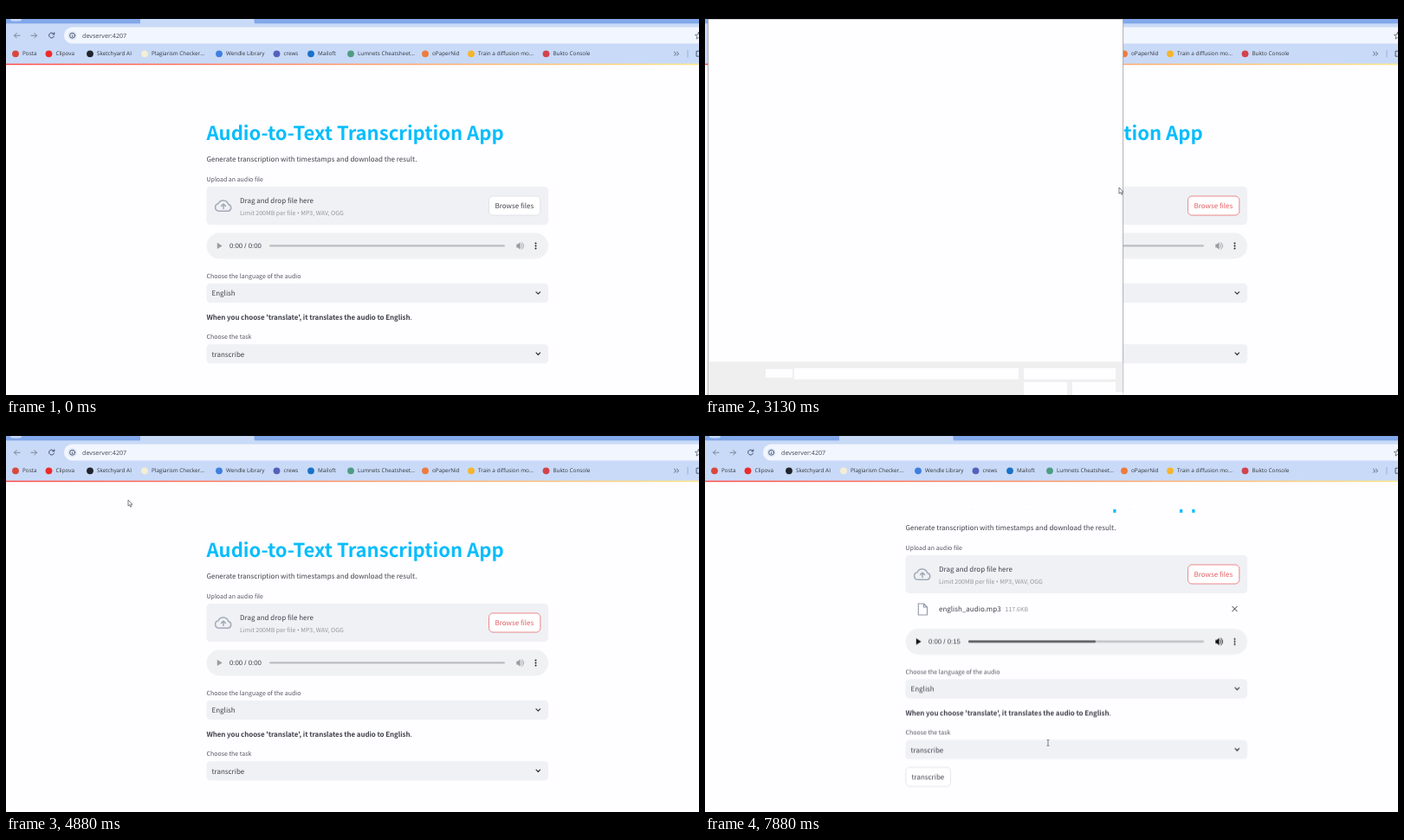
Animation of 800 by 450 pixels, one loop 8000 ms. Source, as an HTML page:

```html
<!DOCTYPE html>
<html lang="en">
<head>
<meta charset="utf-8">
<title>Transcription app</title>
<style>
html, body { margin: 0; width: 100%; height: 100%; overflow: hidden; background: #fefdff; }
svg { display: block; width: 800px; height: 450px; }
text { white-space: pre; text-rendering: geometricPrecision; }

.page text { font: 8px "Noto Sans CJK SC", "Noto Sans CJK JP", "Noto Sans CJK", sans-serif; fill: #40424c; }
.page .title { font-size: 22.1px; font-weight: 700; letter-spacing: -.02px; fill: #08bdfc; }
.page .label { font-size: 7px; fill: #555761; }
.page .faint { font-size: 7px; fill: #96989f; }
.page .strong { font-weight: 700; letter-spacing: -.095px; }
.page .bullet { font-family: "Noto Sans", sans-serif; }
.page .time { font: 7.8px "Liberation Sans", sans-serif; }
.page .warm { fill: #e25b5f; }
.field { fill: #eff1f5; }
.ui text { font: 6.35px "Open Sans", "Noto Sans", sans-serif; fill: #33353b; }
.ui .url { font-size: 7.2px; fill: #44474e; }
.ui .head { fill: #56637a; }
.line { fill: none; stroke: currentColor; stroke-linecap: round; stroke-linejoin: round; }

/* 64 ticks of 125 ms; state changes hold, the pointer steps once per tick */
.hover, .empty, .loaded, .below, .scroll, .dialog, .content, .ripple, .arrow, .hand, .beam
  { animation: 8s step-end infinite; }
.hover { animation-name: hover; }
.empty { animation-name: empty; }
.loaded { animation-name: loaded; }
.below { animation-name: below; }
.scroll { animation-name: scroll; }
.dialog { animation-name: dialog; }
.content { animation-name: content; }
.ripple { animation-name: ripple; }
.arrow { animation-name: arrow; }
.hand { animation-name: hand; }
.beam { animation-name: beam; }
.pointer { animation: travel 8s linear infinite; }

@keyframes hover { 0% { opacity: 0 } 21.875%, 100% { opacity: 1 } }
@keyframes empty { 0% { opacity: 1 } 67.1875%, 100% { opacity: 0 } }
@keyframes loaded { 0% { opacity: 0 } 67.1875%, 100% { opacity: 1 } }
@keyframes below { 0% { transform: none } 67.1875%, 100% { transform: translateY(31.4px) } }
@keyframes scroll {
  0% { transform: none }
  95.3125% { transform: translateY(-14px) }
  96.875% { transform: translateY(-46px) }
  98.4375%, 100% { transform: translateY(-56px) }
}
@keyframes dialog { 0%, 57.8125%, 100% { opacity: 0 } 35.9375% { opacity: 1 } }
@keyframes content { 0% { opacity: 0 } 42.1875%, 100% { opacity: 1 } }
@keyframes ripple { 0%, 79.6875%, 100% { opacity: 0 } 75% { opacity: 1 } }
@keyframes arrow {
  0%, 21.875%, 75%, 82.8125%, 100% { opacity: 0 }
  9.375%, 34.375%, 79.6875% { opacity: 1 }
}
@keyframes hand { 0%, 34.375%, 79.6875%, 100% { opacity: 0 } 21.875%, 75% { opacity: 1 } }
@keyframes beam { 0% { opacity: 0 } 82.8125%, 100% { opacity: 1 } }
@keyframes travel {
  0% { transform: translate(724px, 318px); animation-timing-function: step-end }
  9.375% { transform: translate(724px, 318px); animation-timing-function: steps(6) }
  18.75% { transform: translate(640px, 262px); animation-timing-function: steps(2) }
  21.875% { transform: translate(600px, 236px); animation-timing-function: steps(3) }
  26.5625% { transform: translate(574px, 229px); animation-timing-function: steps(5) }
  34.375% { transform: translate(570px, 229px); animation-timing-function: steps(3) }
  39.0625% { transform: translate(478px, 210px); animation-timing-function: steps(9) }
  53.125% { transform: translate(138px, 92px); animation-timing-function: steps(5) }
  60.9375% { transform: translate(141px, 89px); animation-timing-function: steps(2) }
  64.0625% { transform: translate(165px, 118px); animation-timing-function: steps(8) }
  76.5625% { transform: translate(247.5px, 306.5px); animation-timing-function: steps(2) }
  79.6875% { transform: translate(275px, 335px); animation-timing-function: steps(2) }
  82.8125% { transform: translate(380px, 366px); animation-timing-function: steps(3) }
  87.5% { transform: translate(452px, 368px); animation-timing-function: steps(3) }
  92.1875%, 100% { transform: translate(396px, 370px) }
}
</style>
</head>
<body>
<svg viewBox="0 0 800 450">
  <defs>
    <linearGradient id="stripe" gradientUnits="userSpaceOnUse" x1="0" x2="850" y1="0" y2="0">
      <stop stop-color="#ff4b4b"/><stop offset="1" stop-color="#fff08a"/>
    </linearGradient>
    <clipPath id="pane"><rect x="4" y="53" width="87.500" height="358"/></clipPath>
    <path id="chevron" class="line" d="M-2.300-1.200 0 1.200 2.300-1.200"/>
    <g id="controls">
      <path d="M243.800 273.800v7.200l5.800-3.600z" fill="currentColor"/>
      <path d="M589.300 275.600h1.800l2.500-2.400v8.600l-2.500-2.400h-1.800z" fill="currentColor"/>
      <path class="line" d="M595 275.600q1.500 1.900 0 3.800M595.600 273.600q4.200 3.900 0 7.800" stroke-width=".9"/>
      <g fill="#222"><circle cx="611.500" cy="274.600" r="1"/><circle cx="611.500" cy="277.500" r="1"/><circle cx="611.500" cy="280.400" r="1"/></g>
    </g>
    <!-- explorer icons, centred on their origin -->
    <path id="folder" d="M-3-3.200h2.600l.8 1H3v5.400h-6z" fill="#f8d775"/>
    <path id="star" d="M0-4 1.100-1.300 4-1.100 1.800.8 2.500 3.600 0 2.100-2.500 3.600-1.800.8-4-1.100-1.100-1.300z" fill="#2f8fe0"/>
    <circle id="dot" r="3.600" fill="#1a78d0"/>
    <g id="film"><path d="M-3.500-3.500h7v7h-7z" fill="#4a5260"/><path d="M-1.800-2.500h3.600v5h-3.600z" fill="#8ba5c6"/></g>
    <g id="screen"><path d="M-4-3h8v5h-8z" fill="#2b91d8"/><path d="M-2 3h4" stroke="#66788a"/></g>
    <path id="cube" d="M0-4 3.700-2v4L0 4-3.700 2v-4z" fill="#2ba5d2"/>
    <path id="sheet" class="line" d="M-3-3.500h6v7h-6zM-1.500-1.500h3M-1.500.3h3" stroke="#7c8da0" stroke-width=".8"/>
    <path id="down" d="M-1.300-4h2.600v3.500h2.200L0 3.800-3.500-.5h2.200z" fill="#2d7fd2"/>
    <path id="note" d="M-.6-4 2.400-2v1.400L.5-1.700V2.200a1.700 1.500 0 1 1-1.100-1.400z" fill="#2d7fd2"/>
    <g id="image"><path d="M-4-3h8v6h-8z" fill="#b9d6ec"/><path d="M-4 3l3-4 2 2 1-1 2 3z" fill="#4d7f9e"/></g>
    <g id="drive"><path d="M-4-.2 4 .3v2.200l-5 .2-3-1.200z" fill="#7e848b"/><path d="M-4-.2-1-1.200 4 .3-1 1z" fill="#c5c9ce"/></g>
    <g id="audio"><path d="M-2.600-3.600h3.800l1.400 1.400v5.800h-5.200z" fill="#fff" stroke="#8b8f96" stroke-width=".6"/><circle cy=".5" r="1.900" fill="#7b4350"/><circle cy=".5" r=".7" fill="#f0b45f"/></g>
  </defs>

  <rect width="800" height="450" fill="#fefdff"/>

  <g class="page">
    <g class="scroll">
      <text class="title" x="231.500" y="155">Audio-to-Text Transcription App</text>
      <text x="231.500" y="180.300">Generate transcription with timestamps and download the result.</text>
      <text class="label" x="231.500" y="202.700">Upload an audio file</text>
      <rect class="field" x="231.500" y="209" width="394.500" height="44" rx="4.500"/>
      <g color="#a2aab8">
        <path class="line" d="M245.600 237.200a4.300 4.300 0 0 1-.6-8.500 6.200 6.200 0 0 1 11.700.8 4 4 0 0 1 .2 7.700zM251 234.600v-5.200M248.600 231.400l2.400-2.400 2.400 2.400" stroke-width="1.500"/>
      </g>
      <text x="270" y="228.200">Drag and drop file here</text>
      <text class="faint" x="270" y="241.700">Limit 200MB per file <tspan class="bullet">•</tspan> MP3, WAV, OGG</text>
      <rect x="557.500" y="220" width="59.300" height="22" rx="4.500" fill="#fff" stroke="#d9dae0" stroke-width=".7"/>
      <text x="564.500" y="234">Browse files</text>
      <g class="hover">
        <rect x="557.500" y="220" width="59.300" height="22" rx="4.500" fill="#fff" stroke="#ec7f82" stroke-width=".9"/>
        <text class="warm" x="564.500" y="234">Browse files</text>
      </g>

      <g class="loaded">
        <path class="line" color="#8f98a8" d="M246.300 265h6.200l4 4v9h-10.200zM252.500 265v4h4" stroke-width="1.100"/>
        <text x="270" y="273.700">english_audio.mp3</text>
        <text class="faint" x="346.500" y="273.500">117.6KB</text>
        <path class="line" color="#33353f" d="M608.800 268.200l5.400 5.600m0-5.600-5.400 5.600" stroke-width="1"/>
      </g>

      <g class="below">
        <rect x="231.500" y="262.500" width="394.500" height="30" rx="15" fill="#f0f1f3"/>
        <circle class="ripple" cx="246" cy="277.400" r="8" fill="#dddee1"/>
        <rect x="304" y="276.300" width="272" height="2.200" rx="1.100" fill="#bcbdc0"/>
        <g class="empty">
          <use href="#controls" color="#9b9ca0"/>
          <text class="time" x="258" y="280.200">0:00 / 0:00</text>
        </g>
        <g class="loaded">
          <rect x="304" y="276.300" width="147" height="2.200" rx="1.100" fill="#4e4f53"/>
          <use href="#controls" color="#111"/>
          <text class="time" x="258" y="280.200">0:00 / 0:15</text>
        </g>
        <text class="label" x="231.500" y="314.800">Choose the language of the audio</text>
        <rect class="field" x="231.500" y="321" width="394.500" height="22.300" rx="4.500"/>
        <text x="237.500" y="335.200">English</text>
        <use href="#chevron" x="614.300" y="332" color="#33353f" stroke-width="1.200"/>
        <text x="231.500" y="362.500"><tspan class="strong">When you choose 'translate', it translates the audio to English</tspan>.</text>
        <text class="label" x="231.500" y="385.100">Choose the task</text>
        <rect class="field" x="231.500" y="391.300" width="394.500" height="22.300" rx="4.500"/>
        <text x="237.500" y="405.500">transcribe</text>
        <use href="#chevron" x="614.300" y="402.300" color="#33353f" stroke-width="1.200"/>
        <g class="loaded">
          <rect x="231.800" y="422.900" width="51.700" height="22" rx="4.500" fill="#fff" stroke="#d9dae0" stroke-width=".7"/>
          <text x="238.500" y="436.800">transcribe</text>
        </g>
      </g>
    </g>
    <rect y="66" width="800" height="33.800" fill="#fefdff"/>
  </g>

  <g class="ui">
    <rect width="800" height="15" fill="#000"/>
    <rect y="15" width="800" height="6.500" fill="#83a8ea"/>
    <path d="M155 21.500V15h131.500v3q0 3.500 3.500 3.500z" fill="#c8daf7"/>
    <path d="M5 15h13q0 2.500-3 2.500H8q-3 0-3-2.500z" fill="#c8daf7"/>
    <rect y="20.300" width="800" height="46.600" fill="#c8daf7"/>
    <rect x="67" y="24.500" width="760" height="19" rx="9.500" fill="#f2f6fe"/>
    <g class="line" color="#6f7b90" stroke-width=".9">
      <path d="M16 34.200H9.500m2.800-2.800-2.800 2.800 2.800 2.800M29 34.200h6.500m-2.800-2.800 2.800 2.800-2.800 2.800"/>
      <path d="M55.300 32.500a3 3 0 1 0 .2 2.500M55.800 30.800v2h-2" stroke="#33405a"/>
    </g>
    <circle cx="76.600" cy="34.200" r="5" fill="#dbe5f8"/>
    <circle class="line" cx="76.600" cy="34.200" r="3" color="#3e4756" stroke-width=".8"/>
    <path d="M76.600 32.500v.7m0 .8v2" stroke="#3e4756" stroke-width=".8"/>
    <text class="url" x="88" y="36.800">devserver:4207</text>
    <path class="line" color="#555d6b" d="M799.500 30.500l1 2.600 3 .2-2.300 1.900.8 2.900-2.500-1.600-2.500 1.600.8-2.900-2.300-1.900 3-.2z" stroke-width=".8"/>
    <g id="bookmarks"></g>
    <path class="line" color="#333b49" d="M771.500 53.200l2 2-2 2M774.500 53.200l2 2-2 2" stroke-width=".8"/>
    <path d="M787 51v8.500" stroke="#8aa8dc" stroke-width=".8"/>
    <path class="line" color="#444c5b" d="M802 52.200h-5v6h5" stroke-width=".9"/>
    <rect y="66.700" width="800" height="1.500" fill="url(#stripe)"/>

    <g class="dialog">
      <rect x="3.700" y="15" width="479" height="440" fill="#fefdff" stroke="#9b9ba0" stroke-width=".8"/>
      <rect x="4" y="411.500" width="478.300" height="39" fill="#efeff0"/>
      <path d="M70 420h31v10H70zM103 419h259v13H103zM368 419h106v13H368zM368 435h50v15h-50zM424 435h50v15h-50zM474 446.500h8.500v4H474z" fill="#fefdff"/>
      <rect width="484" height="15" fill="#000"/>
      <g class="content">
        <rect x="4.100" y="411.500" width="478.200" height="39" fill="#efeff0"/>
        <rect x="4.100" y="36.500" width="478.200" height="16" fill="#f5f6f8"/>
        <g class="line" color="#c2c4c8" stroke-width=".8">
          <path d="M18 25.700h-6.500m2.500-2.500-2.500 2.500 2.500 2.500M28 25.700h6.500m-2.500-2.500 2.500 2.500-2.500 2.500M42.500 25l1.500 1.500 1.500-1.500"/>
          <path d="M56.500 29v-6.500M54 25l2.500-2.500L59 25M340 25l2 2 2-2" stroke="#50545c"/>
          <path d="M355.700 24.700a2.600 2.600 0 1 0 .2 2M356 22.800v2h-2" stroke="#50545c"/>
          <path d="M66 18.500h293v14.500H66zM364 18.500h113.500v14.500H364z" stroke="#d7d8dc"/>
          <path d="M346.500 18.500V33" stroke="#d7d8dc"/>
          <path d="M468.500 27.500l-2 2m2-2a1.900 1.900 0 1 1 2.700-2.700 1.900 1.900 0 0 1-2.700 2.700" stroke="#555"/>
        </g>
        <use href="#folder" x="72" y="25.700"/>
        <text x="78" y="27.700">«</text>
        <text x="85.500" y="27.700">work drive (F:)</text>
        <text x="139.500" y="27.700">Sound-ML-Tiny-Builds</text>
        <text x="214" y="27.700">speech2note_via_mp3</text>
        <path class="line" color="#666" d="M132 24l1.700 1.700-1.700 1.700M207 24l1.700 1.700-1.700 1.700M284 24l1.700 1.700-1.700 1.700" stroke-width=".7"/>
        <text x="369" y="27.700" style="fill:#777a80">Search speech2note_via_mp3</text>
        <text x="14" y="46.600">Organize</text>
        <text x="63" y="46.600">New folder</text>
        <path d="M43 43.500h4l-2 2.300zM428.500 43.200h4l-2 2.300z" fill="#444"/>
        <path d="M415 41.500h2.500m1 0h4M415 44h2.500m1 0h4M415 46.500h2.500m1 0h4" stroke="#858a92"/>
        <rect x="445" y="41" width="8" height="6.200" fill="#fff" stroke="#6b8098" stroke-width=".7"/>
        <rect x="449.500" y="41.300" width="3.300" height="5.600" fill="#4b94d4"/>
        <circle cx="469.500" cy="44.200" r="4.500" fill="#16539f"/>
        <text x="468.100" y="46.500" style="fill:#fff">?</text>

        <path d="M184.500 54v13.500M205.500 54v13.500M295.500 54v13.500M362.500 54v13.500M437.500 54v13.500" stroke="#e3e4e8" stroke-width=".8"/>
        <path class="line" color="#888" d="M139.500 55.500l2-1.700 2 1.700" stroke-width=".7"/>
        <g id="columns"></g>
        <rect x="103" y="83.300" width="334" height="12.500" fill="#e0effb"/>
        <g id="files"></g>
        <rect x="4.100" y="313.300" width="87.400" height="13.400" fill="#d8d8da"/>
        <g id="tree" clip-path="url(#pane)"></g>

        <text x="70.500" y="427.600">File name:</text>
        <rect x="103.500" y="419.300" width="258" height="12.400" fill="#fff" stroke="#6ea3dc" stroke-width=".9"/>
        <rect x="368.300" y="419.300" width="105.200" height="12.400" fill="#e6e6e8" stroke="#b0b1b5" stroke-width=".8"/>
        <text x="370.500" y="427.600">Custom Files (*.mp3;*.wav;*.ogg</text>
        <path class="line" color="#555" d="M355.500 424.800l1.500 1.500 1.500-1.500M467.500 424.800l1.500 1.500 1.500-1.500" stroke-width=".7"/>
        <rect x="369" y="435.700" width="48" height="13.300" fill="#e1e2e4" stroke="#3f8fda" stroke-width="1.200"/>
        <rect x="424.500" y="435.400" width="49" height="13.800" fill="#e1e2e4" stroke="#b0b1b5" stroke-width=".8"/>
        <text x="393" y="444.600" text-anchor="middle">Open</text>
        <text x="449" y="444.600" text-anchor="middle">Cancel</text>
      </g>
    </g>
  </g>

  <g class="pointer" stroke="#4c4d52" stroke-width=".7" fill="#fff" stroke-linejoin="round">
    <path class="arrow" d="M0 0v7l1.600-1.400 1.100 2.600 1.200-.5-1.100-2.500h2.100z"/>
    <path class="hand" d="M-.8.800Q0-.6.800.8v3l3 .9q.8.400.6 1.600l-.7 3.700h-4.200L-2.800 6.600q.3-1.200 2 .2z"/>
    <path class="beam" fill="none" d="M-1.500-3.500Q0-3.500 0-2.700V2.700Q0 3.500-1.500 3.500M1.500-3.500Q0-3.500 0-2.700M0 2.700Q0 3.500 1.500 3.500"/>
  </g>
</svg>
<script>
const fill = (id, rows, draw) =>
  document.getElementById(id).innerHTML = rows.map(row => draw(...row)).join("");
const label = (x, y, words, kind = "") => `<text class="${kind}" x="${x}" y="${y + 2.2}">${words}</text>`;
const icon = (name, x, y) => `<use href="#${name}" x="${x}" y="${y}"/>`;

fill("bookmarks", [
  [11, "#d9483b", "Posta"], [49.5, "#ee2b2b", "Clipova"], [97, "#20242c", "Sketchyard AI"],
  [160, "#f4eed2", "Plagiarism Checker..."], [246, "#3f7fe0", "Wendle Library"],
  [312.5, "#5560bd", "crews"], [352, "#1a72c9", "Mailoft"], [398, "#4f9c84", "Lumnets Cheatsheet..."],
  [484, "#ee7b3d", "oPaperNid"], [537, "#f5b52c", "Train a diffusion mo..."], [623.5, "#d3434c", "Bukto Console"],
], (x, color, words) =>
  `<circle cx="${x}" cy="55.300" r="3.900" fill="${color}"/>` + label(x + 8, 55.2, words));

fill("columns", [[103, "Name"], [186.5, "#"], [208.5, "Title"], [298, "Contributing artists"], [365.5, "Album"]],
  (x, words) => label(x, 60.7, words, "head"));

fill("files", [
  ["folder", 77.4, "temp_dir"], ["audio", 89.6, "english_audio.mp3"],
  ["audio", 101.7, "french_audio.mp3"], ["audio", 113.9, "hindi_audio.mp3"],
], (name, y, words) => icon(name, 108.5, y) + label(115, y, words));

fill("tree", [
  ["star", 69.2, "Quick access", 0], ["folder", 82.8, "speech2note_via_mp3"], ["folder", 96.2, "Fast_speech2note_ui"],
  ["film", 109.6, "Videos"], ["folder", 123, "CLIPOVA_VIDEOS"],
  ["dot", 140.8, "NimboBox - Personal", 0], ["folder", 154.2, "Documents"],
  ["screen", 172.2, "This PC", 0], ["cube", 185.7, "3D Objects"], ["screen", 199.1, "Desktop"],
  ["sheet", 212.5, "Documents"], ["down", 226, "Downloads"], ["note", 239.4, "Music"],
  ["image", 252.9, "Pictures"], ["film", 266.3, "Videos"], ["drive", 279.8, "Local Disk (C:)"],
  ["drive", 293.2, "Old C drive (D:)"], ["drive", 306.7, "Apps and Games (E:)"],
  ["drive", 320.1, "work drive (F:)"], ["drive", 333.5, "Current Clipova Videos"],
  ["screen", 351.4, "Network", 0],
], (name, y, words, depth = 1) => icon(name, 22 + depth * 4.3, y) + label(28.5 + depth * 4.5, y, words));
</script>
</body>
</html>
```
